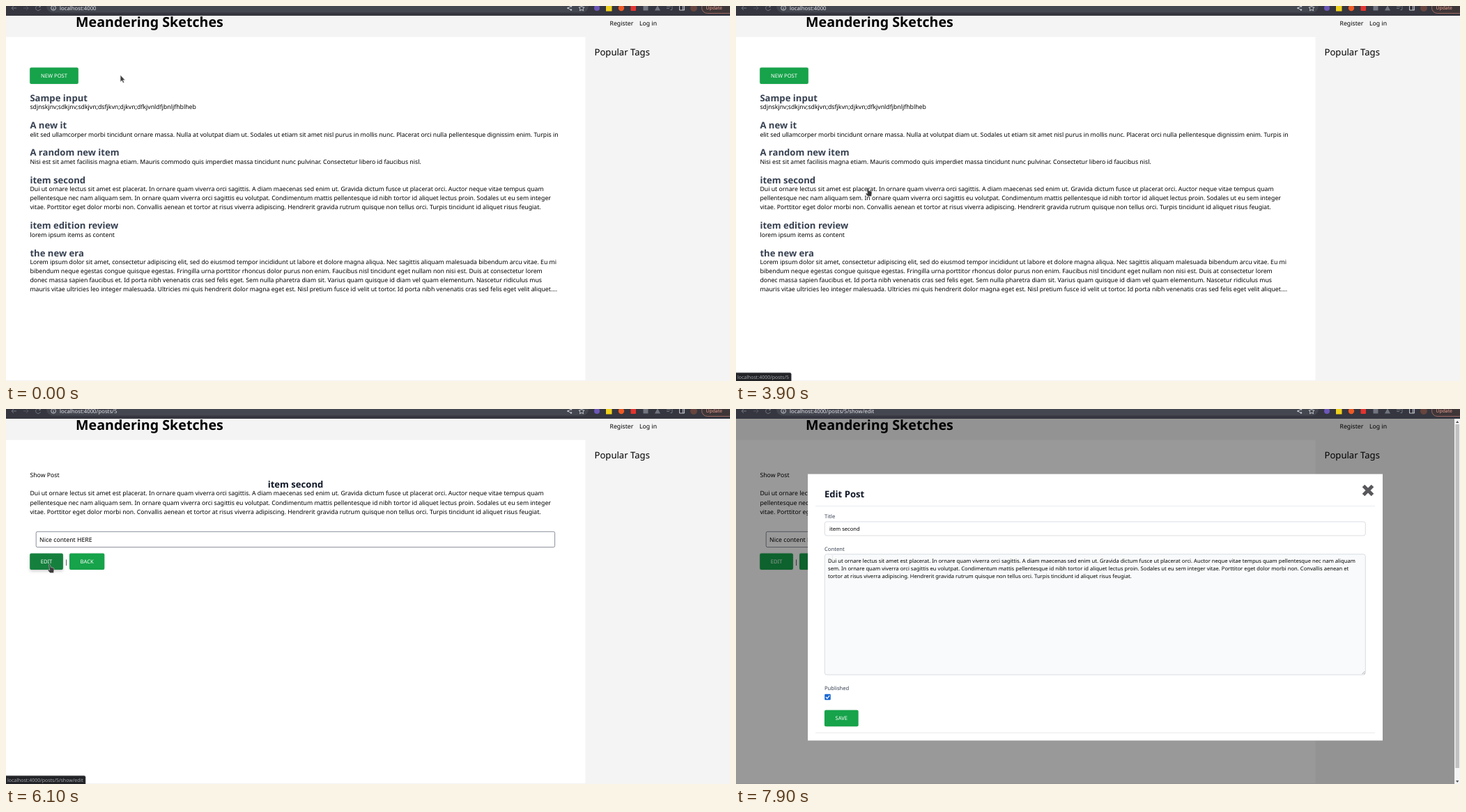
An HTML page for the animation above (8000 ms loop, 1039 by 539 pixels).

```html
<!DOCTYPE html>
<html lang="en">
<head>
<meta charset="utf-8">
<title>Blog demo</title>
<style>
  html, body { margin: 0; width: 100%; height: 100%; overflow: hidden; background: #fff; }
  svg { display: block; width: 1039px; height: 539px; }
  text { font: 8.735px "Noto Sans", sans-serif; text-rendering: geometricPrecision; white-space: pre; }
  .site { font-size: 19.65px; font-weight: 700; }
  .head { font-size: 13.1px; font-weight: 700; fill: #374151; }
  .dark { fill: #111827; }
  .mid { text-anchor: middle; }
  .tags { font-size: 13.1px; }
  .small { font-size: 7.64px; }
  .label { font-size: 7.64px; font-weight: 500; fill: #374151; }
  .url { font-size: 7.75px; fill: #e4e5ea; }
  .update { font-size: 6.8px; fill: #f0a093; }
  .status { font-size: 6.96px; fill: #a3a7ad; }
  .button rect { fill: #16a34a; filter: drop-shadow(0 .8px .8px #0002); }
  .button.hover rect { fill: #15803d; filter: drop-shadow(0 2px 2px #0003); }
  .button text { font-size: 7.64px; font-weight: 500; fill: #fff; text-anchor: middle; }
  .icon { fill: none; stroke: #c6c8ce; stroke-width: 1; }
  .dim { stroke: #72757f; }
  .cursor path { fill: #3c3c3c; stroke: #ddd; stroke-width: .5; }
</style>
</head>
<body>
<svg id="stage" viewBox="0 0 1039 539"></svg>
<script>
const LEFT = 34.4, LINE = 13.1;

const second = [
  'Dui ut ornare lectus sit amet est placerat. In ornare quam viverra orci sagittis. A diam maecenas sed enim ut. Gravida dictum fusce ut placerat orci. Auctor neque vitae tempus quam',
  'pellentesque nec nam aliquam sem. In ornare quam viverra orci sagittis eu volutpat. Condimentum mattis pellentesque id nibh tortor id aliquet lectus proin. Sodales ut eu sem integer',
  'vitae. Porttitor eget dolor morbi non. Convallis aenean et tortor at risus viverra adipiscing. Hendrerit gravida rutrum quisque non tellus orci. Turpis tincidunt id aliquet risus feugiat.'
];
const posts = [
  ['Sampe input', 'sdjnskjnv;sdkjnv;sdkjvn;dsfjkvn;djkvn;dfkjvnldfjbnljfhblheb'],
  ['A new it', 'elit sed ullamcorper morbi tincidunt ornare massa. Nulla at volutpat diam ut. Sodales ut etiam sit amet nisl purus in mollis nunc. Placerat orci nulla pellentesque dignissim enim. Turpis in'],
  ['A random new item', 'Nisi est sit amet facilisis magna etiam. Mauris commodo quis imperdiet massa tincidunt nunc pulvinar. Consectetur libero id faucibus nisl.'],
  ['item second', ...second],
  ['item edition review', 'lorem ipsum items as content'],
  ['the new era',
    'Lorem ipsum dolor sit amet, consectetur adipiscing elit, sed do eiusmod tempor incididunt ut labore et dolore magna aliqua. Nec sagittis aliquam malesuada bibendum arcu vitae. Eu mi',
    'bibendum neque egestas congue quisque egestas. Fringilla urna porttitor rhoncus dolor purus non enim. Faucibus nisl tincidunt eget nullam non nisi est. Duis at consectetur lorem',
    'donec massa sapien faucibus et. Id porta nibh venenatis cras sed felis eget. Sem nulla pharetra diam sit. Varius quam quisque id diam vel quam elementum. Nascetur ridiculus mus',
    'mauris vitae ultricies leo integer malesuada. Ultricies mi quis hendrerit dolor magna eget est. Nisl pretium fusce id velit ut tortor. Id porta nibh venenatis cras sed felis eget velit aliquet.…']
];
const words = second.join(' ');
const breaks = [words.indexOf('sem. In'), words.indexOf('tortor at')];
const editLines = [words.slice(0, breaks[0]), words.slice(breaks[0], breaks[1]), words.slice(breaks[1])];

const text = (x, y, str, cls = '', id = '') => `<text x="${x}" y="${y}" class="${cls}" id="${id}">${str}</text>`;
const rect = (x, y, w, h, fill, more = '') => `<rect x="${x}" y="${y}" width="${w}" height="${h}" fill="${fill}" ${more}/>`;
const circle = (x, y, r, fill) => `<circle cx="${x}" cy="${y}" r="${r}" fill="${fill}"/>`;
const path = (d, more = 'class="icon"') => `<path d="${d}" ${more}/>`;
const lines = (list, x, y, pitch, cls) => list.map((s, i) => text(x, y + i * pitch, s, cls)).join('');
const button = (x, y, w, str, id = '') =>
  `<g class="button" id="${id}">${rect(x, y, w, 23.5, '', 'rx="2"')}${text(x + w / 2, y + 14.6, str)}</g>`;

function postList() {
  let y = 131.8;
  return posts.map(([title, ...body]) => {
    const item = text(LEFT, y + 5, title, 'head') + lines(body, LEFT, y + LINE + 3.3, LINE);
    y += LINE * (body.length + 2);
    return item;
  }).join('');
}

const toolbar = rect(0, 0, 1039, 14, '#35363f') + rect(58, -9, 778, 18.5, '#444650', 'rx="9"') +
  path('M15 3H8M11 0L8 3L11 6', 'class="icon dim"') + path('M25 3H32M29 0L32 3L29 6', 'class="icon dim" opacity=".5"') +
  path('M49 1A3.5 3.5 0 1 0 49.5 4M49.5 -1V1.5H47', 'class="icon dim"') +
  path('M64.7 2.8a3.4 3.4 0 1 0 6.8 0a3.4 3.4 0 1 0-6.8 0M68.1 2.4V5M68.1 .6V1.5') +
  text(77, 5.6, '', 'url', 'url') +
  path('M811 0L806.5 3L811 6', 'class="icon"') + circle(811, .5, 1.2, '#c6c8ce') + circle(806.5, 3, 1.2, '#c6c8ce') + circle(811, 5.5, 1.2, '#c6c8ce') +
  path('M826 -1L827.2 1.7L830 2L828 4L828.6 6.8L826 5.4L823.4 6.8L824 4L822 2L824.8 1.7Z') +
  circle(848, 3, 4, '#6c56b8') + rect(861, -1, 8.5, 8.5, '#f1d21c') + circle(883, 3, 4.2, '#ee5a24') +
  rect(896.5, -1, 7.5, 8, '#e3342f', 'rx="1"') + rect(914.5, -.5, 7, 7, '#72757f') +
  path('M935 -1L939 6.5H931Z', 'fill="#72757f"') + path('M948 1H954M948 3.5H952M956 0V5M953.5 5.5H956', 'class="icon dim"') +
  path('M966.5 -1H973.5V6H966.5ZM971.5 -1V6') + circle(987, 3, 5, '#68453f') +
  rect(998.5, -6, 48, 16.5, '#3f3638', 'rx="8" stroke="#b9776d" stroke-width=".8"') + text(1004.5, 5.3, 'Update', 'update');

const postPage = text(LEFT, 98.2, 'Show Post') + text(415.5, 112.8, 'item second', 'head dark mid') +
  lines(second, LEFT, 124.4, LINE) +
  rect(43.2, 176.3, 744.4, 22.3, '#fff', 'rx="2" stroke="#6b7280" stroke-width=".8"') + text(48, 190.5, 'Nice content HERE') +
  button(34.2, 207.4, 47.7, 'EDIT', 'edit') + text(84.2, 222.6, '|') + button(91, 207.4, 50.3, 'BACK', 'back');

const field = 'rx="3" stroke="#d1d5db" stroke-width=".8"';
const modal = rect(103, 93.5, 825, 383, '#fff') + text(127, 126.7, 'Edit Post', 'head dark') +
  path('M900.5 110.5L913.5 123.5M913.5 110.5L900.5 123.5', 'stroke="#58585c" stroke-width="5"') +
  rect(114, 139, 803, .8, '#e5e7eb') + rect(114, 465, 803, .8, '#e5e7eb') +
  text(127, 156.8, 'Title', 'label') + rect(127.3, 162, 776, 20, '#fff', field) + text(134, 174.6, 'item second', 'small') +
  text(127, 203.8, 'Content', 'label') + rect(127.3, 208.7, 776, 173.3, '#f9fafb', field) +
  lines(editLines, 132, 221.3, 10.92, 'small') + path('M898.5 381L902.5 377M901 381L902.5 379.5', 'stroke="#777" stroke-width=".6"') +
  text(127, 403.6, 'Published', 'label') + rect(127.2, 409.7, 8.6, 8.6, '#1967d2', 'rx="1.2"') +
  path('M129 414L130.9 416L134.2 411.8', 'fill="none" stroke="#fff" stroke-width="1.2"') +
  button(127, 432.7, 48.6, 'SAVE');

const scrollbar = rect(1031, 14, 8, 525, '#f4f4f4') + rect(1032.4, 22, 5.6, 494, '#c1c1c1') +
  path('M1033 20L1035.2 17L1037.4 20ZM1033 534L1035.2 537L1037.4 534Z', 'fill="#555"');

stage.innerHTML = rect(0, 0, 1039, 539, '#fff') + rect(0, 14, 1039, 30.5, '#f4f4f4') + rect(831.5, 44, 207.5, 495, '#f4f4f4') +
  rect(0, 538, 1039, 1, '#f4f4f4') +
  text(100, 29.8, 'Meandering Sketches', 'site') + text(866.5, 28.3, 'Register') + text(909, 28.3, 'Log in') + text(844.5, 71.2, 'Popular Tags', 'tags') +
  `<g id="listPage">${button(34.2, 88.4, 69.6, 'NEW POST')}${postList()}</g>` +
  `<g id="postPage">${postPage}</g>` +
  `<g id="overlay">${rect(0, 14, 1039, 525, '#000', 'opacity=".4"')}</g><g id="modal">${modal}</g><g id="scrollbar">${scrollbar}</g>` +
  rect(0, 14, 0, 1.6, '#2299dd', 'id="progress" style="filter:drop-shadow(0 0 1px #0004)"') + toolbar +
  `<g id="status">${rect(-3, 527.2, 0, 15, '#222327', 'id="statusBox" rx="2" stroke="#45474d" stroke-width=".6"')}${text(2, 535.6, '', 'status', 'statusText')}</g>` +
  `<g class="cursor" id="cursor">
    <path id="arrow" d="M0 0V9.6L2.2 7.6L3.8 11L5.3 10.3L3.7 7H6.6Z"/>
    <path id="hand" d="M1.4 .6Q2.6 -.4 3.3 .9L4.2 4.4L8 5.3Q9.2 5.8 8.9 8L8.3 12.6H3.3L.3 9.2Q0 7.8 1.3 8L2.7 8.6Z"/>
    <path id="beam" d="M-1.5 -4H1.5M0 -4V4M-1.5 4H1.5"/>
  </g>`;

// [time, x, y]; repeated positions are pauses
const route = [
  [0, 164.2, 99.4], [900, 780, 110], [1300, 958, 42], [1600, 926, 29], [1800, 917, 27], [1900, 917, 27],
  [2400, 167, 271], [2900, 167, 271], [3200, 192, 219], [3300, 192, 219], [3600, 198, 228], [3900, 186, 261],
  [4400, 186.5, 260.5], [4500, 186.5, 260.5], [4600, 161, 250], [4700, 161, 250], [4800, 74, 206], [4900, 114, 199],
  [5000, 114, 199], [5300, 54, 217], [5400, 54, 217], [5700, 66, 224], [6000, 66, 224], [6100, 60, 223],
  [6300, 130, 223], [6800, 130, 223], [6900, 86, 223], [7000, 86, 223], [7200, 45.5, 223], [7500, 45.5, 223],
  [7600, 61.5, 221], [7700, 61.5, 221], [7800, 116, 217], [7900, 138.5, 215]
];
const pointers = [[0, 'arrow'], [1600, 'hand'], [2000, 'arrow'], [2200, 'hand'], [4300, 'arrow'], [5200, 'hand'], [7600, 'arrow'], [7900, 'beam']];
const links = [[0, ''], [1600, 'users/log_in'], [2200, 'posts/5'], [3100, 'posts/6'], [3600, 'posts/5'], [4600, ''],
  [5500, 'posts/5/show/edit'], [6300, 'posts'], [7100, 'posts/5/show/edit'], [7900, '']];
const addresses = [[0, ''], [4300, '/posts/5'], [7600, '/posts/5/show/edit']];
const hovers = [[0, ''], [5200, 'edit'], [6200, 'back'], [7100, 'edit'], [7600, '']];
const loads = [[0, 0], [4100, 84], [4200, 300], [4300, 1039], [4600, 0], [7400, 84], [7600, 1039], [7900, 0]];
const fades = [[0, 0], [7600, .7], [7800, .95], [7900, 1]];

const latest = (beats, t) => beats.findLast(b => b[0] <= t)[1];
const show = (el, on) => { el.style.display = on ? '' : 'none'; };
const $ = id => document.getElementById(id);

function position(t) {
  const i = route.findLastIndex(p => p[0] <= t);
  const [t0, x0, y0] = route[i], [t1, x1, y1] = route[i + 1] || [t0 + 1, x0, y0];
  const k = (t - t0) / (t1 - t0);
  return [x0 + (x1 - x0) * k, y0 + (y1 - y0) * k];
}

function draw() {
  const t = Math.floor(performance.now() % 8000 / 100) * 100;
  const fade = latest(fades, t), link = latest(links, t), fading = t === 4500 || t === 7800;

  show($('listPage'), t < 4300);
  show($('postPage'), t >= 4300);
  show($('scrollbar'), fade > 0);
  $('overlay').style.opacity = Math.min(1, fade * 1.37);
  $('modal').style.opacity = fade;
  $('url').textContent = 'localhost:4000' + latest(addresses, t);

  $('progress').setAttribute('width', latest(loads, t));
  $('progress').style.opacity = fading ? .4 : 1;

  show($('status'), link);
  $('status').style.opacity = fading ? .45 : 1;
  $('statusText').textContent = 'localhost:4000/' + link;
  if (link) $('statusBox').setAttribute('width', $('statusText').getComputedTextLength() + 8.2);

  for (const id of ['edit', 'back']) $(id).classList.toggle('hover', latest(hovers, t) === id);
  for (const id of ['arrow', 'hand', 'beam']) show($(id), latest(pointers, t) === id);
  $('cursor').setAttribute('transform', `translate(${position(t)})`);
  requestAnimationFrame(draw);
}
draw();
</script>
</body>
</html>
```
